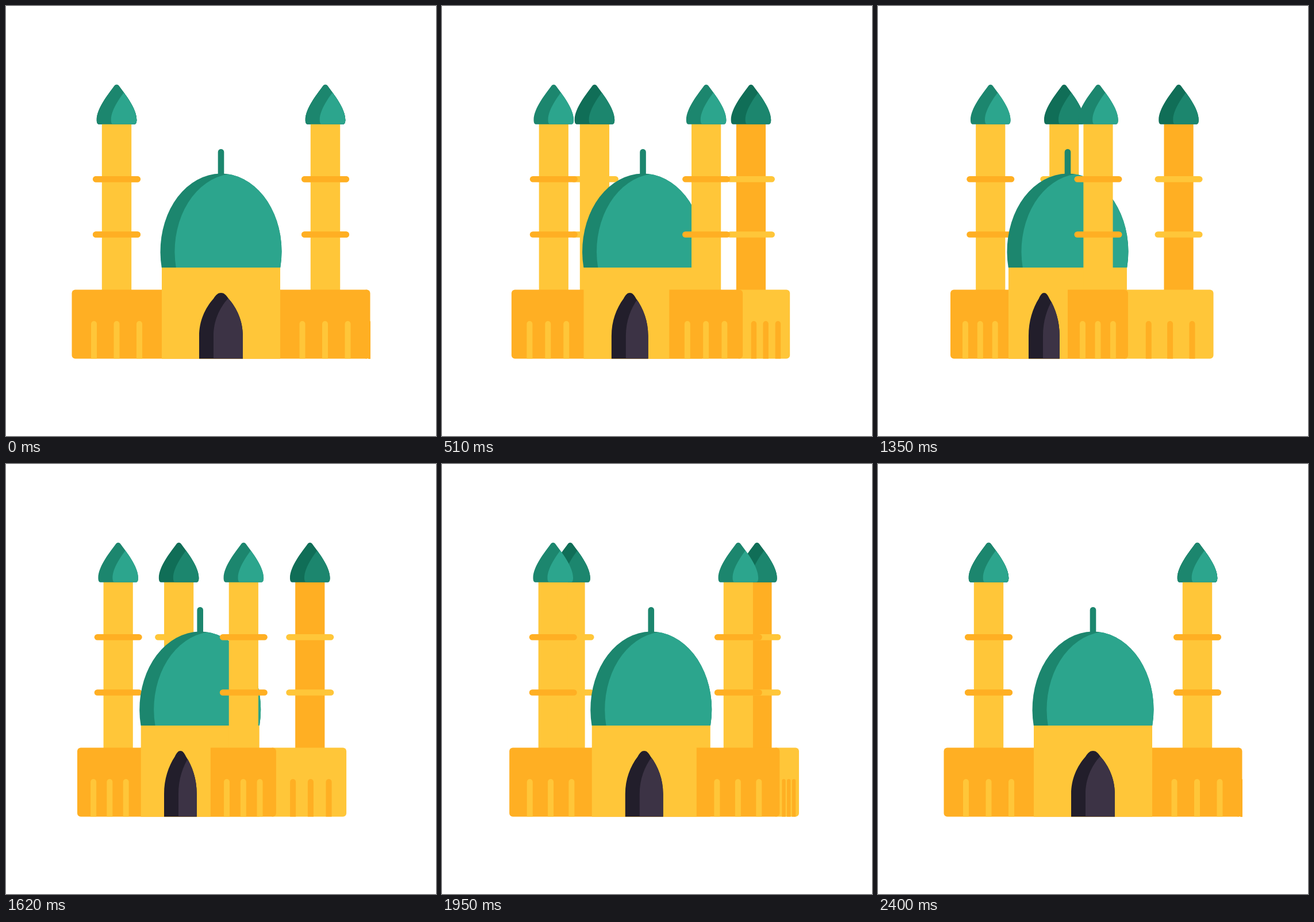
Recreate the animation shown at these times as an HTML page with a canvas. Size 748x748 px, loop 2460 ms.

```html
<!DOCTYPE html>
<html lang="en">
<head>
<meta charset="utf-8">
<title>Turning mosque</title>
<style>
html, body { margin: 0; width: 100%; height: 100%; overflow: hidden; background: #fff; }
canvas { display: block; width: 748px; height: 748px; }
</style>
</head>
<body>
<canvas id="stage" width="748" height="748"></canvas>
<script>
const ctx = document.getElementById('stage').getContext('2d');

const LOOP = 2460, HALF = 1200, STEP = 30;
const YELLOW = '#ffc639', ORANGE = '#ffaf23';
const MINT = '#2ca58d', GREEN = '#1c866e', DEEP = '#106e57';
const NIGHT = '#221e2b', PLUM = '#3c3345';
const SHADE = 25;               // width of the shadow on the left of curved parts
const WALL_TOP = 493.5, BASE = 613.5;

// Cubic timing curve with handles (x1, 0) and (x2, 1)
function ease(u, x1, x2) {
  let lo = 0, hi = 1;
  for (let i = 0; i < 30; i++) {
    const s = (lo + hi) / 2, r = 1 - s;
    const x = 3 * s * r * r * x1 + 3 * s * s * r * x2 + s * s * s;
    if (x < u) lo = s; else hi = s;
  }
  return lo * lo * (3 - 2 * lo);
}

function rect(left, right, top, bottom, color, radius = 0) {
  ctx.fillStyle = color;
  ctx.beginPath();
  ctx.roundRect(left, top, right - left, bottom - top, radius);
  ctx.fill();
}

// Fills a shape with its shadow, then the lit part: the overlap with a shifted copy
function shaded(path, dark, lit) {
  ctx.save();
  ctx.fillStyle = dark;
  ctx.fill(path);
  ctx.clip(path);
  ctx.translate(SHADE, 0);
  ctx.fillStyle = lit;
  ctx.fill(path);
  ctx.restore();
}

function capPath(x) {
  const path = new Path2D();
  path.moveTo(x, 136.8);
  for (const side of [1, -1]) {
    const at = d => x + side * d;
    path.moveTo(x, 136.8);
    path.bezierCurveTo(at(1.8), 136.8, at(3.4), 137.8, at(4.6), 139.8);
    path.bezierCurveTo(at(13.5), 152, at(34.8), 178, at(34.8), 198);
    path.bezierCurveTo(at(34.8), 203, at(33.5), 205.7, at(31), 205.7);
    path.lineTo(x, 205.7);
    path.closePath();
  }
  return path;
}

function tower(x, back, shaft) {
  rect(x - 25.6, x + 25.6, 204, WALL_TOP + 2, shaft);
  for (const y of [301.3, 397.5])
    rect(x - 41.5, x + 41.5, y - 5.3, y + 5.3, back ? YELLOW : ORANGE, 5.3);
  shaded(capPath(x), back ? DEEP : GREEN, back ? GREEN : MINT);
}

function dome(x) {
  rect(x - 5.3, x + 5.3, 248.8, 300, GREEN, [5.3, 5.3, 0, 0]);
  const path = new Path2D();
  const low = Math.asin(28 / 135.5);
  path.ellipse(x, 427, 105.5, 135.5, 0, Math.PI - low, low);
  path.closePath();
  shaded(path, GREEN, MINT);
  rect(x - 103, x + 103, 455, BASE, YELLOW);
}

function door(left, width) {
  const mid = left + width / 2, k = width / 76;
  const path = new Path2D();
  path.moveTo(left, BASE);
  path.lineTo(left, 574);
  path.bezierCurveTo(left, 548, mid - 28 * k, 526, mid - 13 * k, 509);
  path.bezierCurveTo(mid - 8.5 * k, 502, mid - 5 * k, 499, mid, 499);
  path.bezierCurveTo(mid + 5 * k, 499, mid + 8.5 * k, 502, mid + 13 * k, 509);
  path.bezierCurveTo(mid + 28 * k, 526, left + width, 548, left + width, 574);
  path.lineTo(left + width, BASE);
  path.closePath();
  shaded(path, NIGHT, PLUM);
}

function stripe(x, color, width = 10) {
  rect(x - width / 2, x + width / 2, 548, BASE, color, [width / 2, width / 2, 0, 0]);
}

function draw(time) {
  const t = Math.min(Math.floor(time / STEP) * STEP, 2 * HALF);
  const going = t <= HALF;
  const u = going ? t / HALF : (t - HALF) / HALF;
  const turn = going ? ease(u, 0.333, 0.4) : 1 - ease(u, 0.6, 0.4);
  const squeeze = going ? turn : 1 - ease(u, 0.6, 0.667);
  const move = (from, by) => from + by * turn;

  ctx.fillStyle = '#fff';
  ctx.fillRect(0, 0, 748, 748);

  tower(move(192.5, 133.5), true, YELLOW);
  tower(move(555.5, -33), true, ORANGE);
  tower(move(192.5, 3.3), false, YELLOW);
  dome(move(374, -44.8));
  tower(move(555.5, -175.5), false, YELLOW);

  // Side wall
  const corner = move(633.5, -202);
  rect(corner - 12, move(632.3, -49.6), WALL_TOP, BASE, YELLOW, 6);
  for (const by of [-164, -126, -87])
    stripe(move(632, by), ORANGE, Math.min(10, 4 + 10 * turn));

  // Front wall
  rect(move(114.5, 11.7), corner, WALL_TOP, BASE, ORANGE, 6);
  rect(move(271, -44.8), move(477, -149.5), WALL_TOP - 1, BASE, YELLOW);
  const stripes = [[153, -1.1], [192.5, -15], [232, -28.8],
                   [515.5, -162.3], [555, -175.5], [594.5, -188.8]];
  for (const [from, by] of stripes) stripe(move(from, by), YELLOW);
  door(move(336, -75.3), 76 - 22.4 * squeeze);
}

const start = performance.now();
function frame() {
  draw((performance.now() - start) % LOOP);
  requestAnimationFrame(frame);
}
frame();
</script>
</body>
</html>
```
